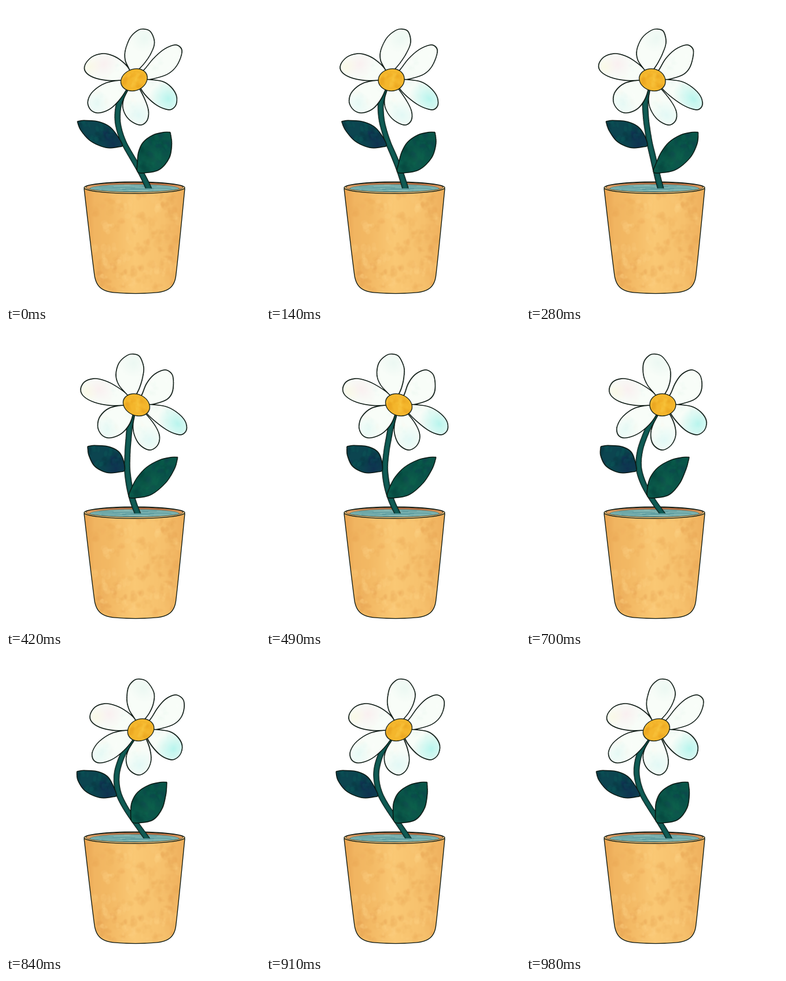
These frames come from a looping animation (439 by 512 pixels, 1050 ms). An HTML page with a canvas:

```html
<!DOCTYPE html>
<html lang="en">
<head>
<meta charset="utf-8">
<title>Swaying daisy</title>
<style>
html, body { margin: 0; width: 100%; height: 100%; overflow: hidden; background: #fff; }
canvas { display: block; width: 439px; height: 512px; }
</style>
</head>
<body>
<canvas id="stage" width="439" height="512"></canvas>
<script>
const W = 439, H = 512, SCALE = 2;
const LOOP = 1050, STEP = 70;
const INK = '#08150f';

let seed = 11;
function rand() {
  seed = (seed * 16807) % 2147483647;
  return seed / 2147483647;
}
const between = (a, b) => a + (b - a) * rand();

function layer() {
  const c = document.createElement('canvas');
  c.width = W * SCALE;
  c.height = H * SCALE;
  const g = c.getContext('2d');
  g.scale(SCALE, SCALE);
  g.lineJoin = 'round';
  return g;
}

// Smooth curve through points; both ends stay sharp.
function curve(p) {
  const n = p.length / 2;
  const at = i => {
    const k = 2 * Math.max(0, Math.min(n - 1, i));
    return [p[k], p[k + 1]];
  };
  const path = new Path2D();
  path.moveTo(p[0], p[1]);
  for (let i = 0; i < n - 1; i++) {
    const [a, b, c, d] = [at(i - 1), at(i), at(i + 1), at(i + 2)];
    path.bezierCurveTo(
      b[0] + (c[0] - a[0]) / 6, b[1] + (c[1] - a[1]) / 6,
      c[0] - (d[0] - b[0]) / 6, c[1] - (d[1] - b[1]) / 6, c[0], c[1]);
  }
  return path;
}

function oval(x, y, rx, ry) {
  const path = new Path2D();
  path.ellipse(x, y, rx, ry, 0, 0, Math.PI * 2);
  return path;
}

// Soft mottling inside a box, made of small clusters.
function mottle(g, [x0, y0, x1, y1], count, size, alpha, colors) {
  g.save();
  g.filter = 'blur(1.6px)';
  for (let i = 0; i < count; i++) {
    const x = between(x0, x1), y = between(y0, y1);
    g.fillStyle = colors[i % colors.length];
    for (let k = 0; k < 4; k++) {
      g.globalAlpha = alpha * between(0.4, 1);
      g.fill(oval(x + between(-size, size), y + between(-size, size),
        size * between(0.3, 0.9), size * between(0.3, 1.1)));
    }
  }
  g.restore();
}

function glow(g, x, y, r, color) {
  const f = g.createRadialGradient(x, y, 0, x, y, r);
  f.addColorStop(0, color);
  f.addColorStop(1, color.slice(0, 7) + '00');
  g.fillStyle = f;
  g.fillRect(x - r, y - r, 2 * r, 2 * r);
}

function shape(g, path, fill, line, texture) {
  g.save();
  g.clip(path);
  g.fillStyle = fill;
  g.fillRect(0, 0, W, H);
  texture();
  g.restore();
  g.strokeStyle = INK;
  g.lineWidth = line;
  g.stroke(path);
}

function drawPot() {
  const g = layer();
  const body = new Path2D(
    'M135 315 C139 350 147 420 153 465 C156 483 165 492 187 494 ' +
    'C210 496 238 496 260 494 C282 492 291 483 293.5 466 ' +
    'C299 420 305 355 309 315 Z');
  shape(g, body, '#f5bf6b', 1.3, () => {
    const side = g.createLinearGradient(136, 0, 308, 0);
    side.addColorStop(0, '#e9a552');
    side.addColorStop(0.1, '#f1b561');
    side.addColorStop(0.25, '#f3b964');
    side.addColorStop(0.5, '#fac874');
    side.addColorStop(0.8, '#f6c06c');
    side.addColorStop(1, '#eeaf5c');
    g.fillStyle = side;
    g.fillRect(130, 300, 185, 200);
    mottle(g, [140, 325, 302, 490], 75, 7, 0.25, ['#eba755', '#ffd487', '#f0b25f']);
    mottle(g, [155, 430, 290, 490], 30, 5, 0.3, ['#e8a354', '#fdd080']);
    mottle(g, [264, 325, 298, 450], 16, 5, 0.25, ['#e9a756']);
  });

  const rim = oval(222, 313.2, 87, 10);
  shape(g, rim, '#f8cd86', 1.3, () => {});
  shape(g, oval(222, 312.4, 84, 8.2), '#c98350', 0.7, () => {
    const wall = g.createLinearGradient(138, 0, 306, 0);
    wall.addColorStop(0, '#e2a566');
    wall.addColorStop(0.3, '#b97549');
    wall.addColorStop(0.75, '#b36b40');
    wall.addColorStop(1, '#df9c5c');
    g.fillStyle = wall;
    g.fillRect(130, 300, 185, 25);
    const pool = oval(222, 314.8, 77, 7.2);
    g.save();
    g.clip(pool);
    g.fillStyle = '#79b0ae';
    g.fillRect(130, 300, 185, 30);
    g.lineWidth = 0.8;
    for (let i = 0; i < 34; i++) {
      const x = between(150, 270), y = between(308, 321);
      g.strokeStyle = ['#3f8791', '#a5cdc0', '#5a9aa0'][i % 3];
      g.globalAlpha = 0.65;
      g.beginPath();
      g.moveTo(x, y);
      g.lineTo(x + between(15, 50), y + between(-0.4, 0.4));
      g.stroke();
    }
    g.restore();
    g.strokeStyle = '#5b7d72';
    g.lineWidth = 0.6;
    g.stroke(pool);
  });
  return g.canvas;
}

const STEM = [224, 135, 216, 146, 208, 160, 203, 180, 200.5, 205, 203.5, 235, 212.5, 262, 225, 290, 239, 318];
const LEFT_LEAF = [131, 199, 143, 197.3, 168, 199.5, 188, 211, 200, 238, 192, 243, 170, 244, 147, 233, 134, 214, 131, 199];
const RIGHT_LEAF = [288, 217.5, 276, 217.8, 257, 222.5, 237, 235, 225, 252, 219.5, 270, 218, 286, 232, 287.5, 256, 282, 276, 262, 286, 237, 288, 217.5];
const PETALS = [
  [222, 122, 213, 108, 203, 93, 199.7, 76, 205, 55, 217, 42.5, 228, 39.7, 240, 44.5, 248, 63, 245, 82, 238, 98, 230, 110, 222, 122],
  [230, 123, 241, 108, 251, 91, 264, 76.5, 278, 68.5, 288, 67.5, 297, 75, 298, 89, 293, 106, 282, 117.5, 263, 124.5, 247, 127, 230, 123],
  [232, 126, 249, 126.5, 276, 130, 293, 140, 304, 155, 304, 170, 295, 178.5, 283, 177, 269, 170, 254, 157.5, 242, 144, 232, 126],
  [226, 127, 219, 145, 213, 161, 212, 176, 218, 192, 229, 202, 241, 205, 252, 197, 256, 182, 252, 166, 241, 146, 226, 127],
  [222, 127, 204, 127.5, 178, 133, 159, 147, 151.5, 163, 154, 176, 163, 183.5, 175, 183.5, 191, 176.5, 205, 163, 215, 147, 222, 127],
  [222, 126, 213, 108, 193, 92, 175, 84, 160, 82.2, 144, 88, 135.7, 101, 139, 113, 155, 123, 180, 128.3, 204, 128, 222, 126]
];

function drawFlower() {
  const g = layer();
  g.save();
  g.beginPath();
  g.rect(0, 0, W, 314.5);
  g.clip();
  const stem = curve(STEM);
  g.strokeStyle = INK;
  g.lineWidth = 10.4;
  g.stroke(stem);
  g.strokeStyle = '#0d5550';
  g.lineWidth = 8.2;
  g.stroke(stem);
  g.strokeStyle = '#17695d66';
  g.lineWidth = 3;
  g.stroke(stem);
  g.restore();

  shape(g, curve(LEFT_LEAF), '#0c4550', 1.5, () => {
    mottle(g, [130, 197, 200, 245], 40, 5, 0.3, ['#0a5a58', '#172f55', '#08343f']);
    glow(g, 185, 236, 22, '#12235088');
  });
  shape(g, curve(RIGHT_LEAF), '#0a5549', 1.5, () => {
    mottle(g, [218, 217, 288, 288], 45, 6, 0.28, ['#0c684f', '#114050', '#08463f']);
    glow(g, 248, 265, 24, '#15704f66');
  });

  for (const points of PETALS) {
    shape(g, curve(points), '#f8fdf8', 1.6, () => {
      mottle(g, [134, 40, 306, 206], 70, 6, 0.16, ['#ffffff', '#e4f7f0', '#fdf8ee']);
      glow(g, 290, 160, 34, '#9ff2eab0');
      glow(g, 168, 100, 26, '#fbdde566');
      glow(g, 145, 105, 20, '#fbf6d980');
      glow(g, 230, 55, 24, '#e3f5ef90');
      glow(g, 166, 170, 24, '#dcf8f590');
      glow(g, 238, 188, 26, '#d3f6f490');
    });
  }

  shape(g, oval(226.4, 127.3, 22.5, 19.2), '#f4b62c', 1.2, () => {
    mottle(g, [204, 108, 249, 147], 26, 4, 0.35, ['#fbc944', '#eaa320', '#f8bf38']);
  });
  return g.canvas;
}

const pot = drawPot(), flower = drawFlower();
const ctx = document.getElementById('stage').getContext('2d');
ctx.imageSmoothingQuality = 'high';

// A wave runs up the plant and slides each row sideways.
function sway(y, t) {
  const delay = 175 + 4.05 * (127 - y);
  return -10 * Math.cos(2 * Math.PI * (t - delay) / LOOP);
}

function paint(t) {
  ctx.fillStyle = '#fff';
  ctx.fillRect(0, 0, W, H);
  ctx.drawImage(pot, 0, 0, W, H);
  for (let y = 36; y < 316; y++) {
    ctx.drawImage(flower, 0, y * SCALE, W * SCALE, SCALE, sway(y + 0.5, t), y, W, 1);
  }
}

let shown = 0;
paint(0);
function tick(now) {
  const t = Math.floor((now % LOOP) / STEP) * STEP;
  if (t !== shown) paint(shown = t);
  requestAnimationFrame(tick);
}
requestAnimationFrame(tick);
</script>
</body>
</html>
```
